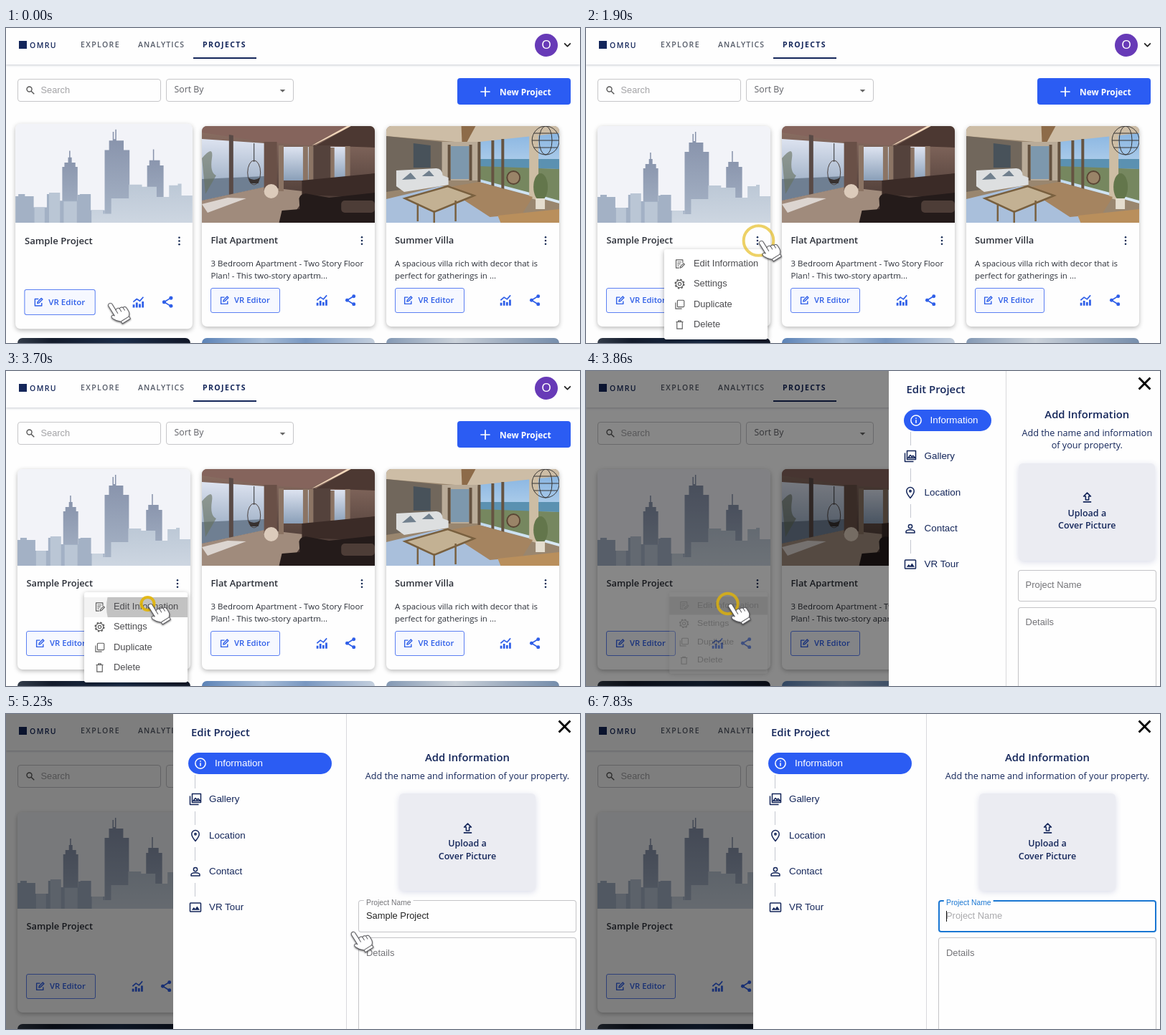
Write an HTML page that moves like this. It is 800 by 440 pixels and loops after 8000 ms.

```html
<!DOCTYPE html>
<html lang="en">
<head>
<meta charset="utf-8">
<title>Edit project information</title>
<style>
html, body { margin: 0; width: 100%; height: 100%; overflow: hidden; background: #fefefe; }
#stage { position: absolute; left: 0; top: 0; width: 800px; height: 440px; overflow: hidden; background: #fefefe;
  font-family: "Open Sans", "Noto Sans", sans-serif; color: #2b2f38; }
#stage div, #stage svg { position: absolute; box-sizing: border-box; }
.t { white-space: pre; line-height: 20px; }
.a { font-family: "Liberation Sans", Arial, sans-serif; }
.s { font-weight: 600; }
.navy { color: #14265a; }
#head { left: 0; top: 0; width: 800px; height: 51px; background: #fefefe; box-shadow: 0 1px 3px rgba(40, 50, 80, .25); }
.box { border: 1px solid #c6c6c9; border-radius: 4px; }
.card { width: 241px; height: 280px; top: 137px; border-radius: 7px; background: #fefefe;
  box-shadow: 0 2px 6px rgba(0, 0, 0, .28); }
.card > .pic { left: 0; top: 0; border-radius: 7px 7px 0 0; }
.vr { left: 12px; top: 225.5px; width: 97px; height: 35px; border: 1px solid #5c80f2; border-radius: 3px; background: #f6f8ff; }
.next { top: 433px; width: 241px; height: 20px; border-radius: 7px 7px 0 0; }
#menu { left: 109px; top: 309px; width: 143.5px; height: 126px; background: #fff; border-radius: 3px; transform-origin: 100% 0;
  box-shadow: 0 2px 7px rgba(0, 0, 0, .32); }
#row { left: 0; top: 6.5px; width: 143.5px; height: 28px; overflow: hidden; background: #f3f3f3; }
#ripple { border-radius: 50%; background: rgba(40, 40, 40, .24); }
#shade { left: 0; top: 0; width: 800px; height: 440px; background: #000; }
#panel { right: 0; top: 0; height: 440px; background: #fefefe; overflow: hidden; }
#side { left: 0; top: 0; width: calc(41.36% + 7.5px); height: 440px; border-right: 1px solid #d9d9dc; overflow: hidden; }
#pill { left: 21px; right: 20px; top: 54px; height: 30px; border-radius: 15px; background: #2b5cf3; }
#main { left: calc(41.36% + 7.5px); right: 0; top: 50px; padding: 0 5px 0 16px; height: 390px; text-align: center; }
#main h2 { margin: 0; font-size: 14.8px; font-weight: 600; line-height: 20px; }
#main p { margin: 7.5px -20px 16px; padding: 0 20px; font-size: 12.63px; line-height: 17.5px; }
#stage #main > div { position: relative; }
#upload { width: 190px; height: 136px; margin: 0 auto 13px; border-radius: 6px; background: #ebecf2; left: 0;
  box-shadow: 0 2px 8px rgba(70, 80, 150, .2); }
#upload span { position: absolute; left: 0; right: 0; top: 61px; font-size: 12.5px; line-height: 17.5px; font-weight: 600; }
#name { height: 44.5px; margin-bottom: 7.5px; border-radius: 4px; }
#details { height: 150px; border-radius: 4px; }
#name > div, #details > div { text-align: left; }
#label { left: 7px; top: 11px; padding: 0 4px; background: #fefefe; transform-origin: 4px 50%; }
#caret { width: 1px; height: 15px; top: 14.5px; background: #111; }
</style>
</head>
<body>
<div id="stage"></div>
<script>
const BLUE = '#2f5fe8', NAVY = '#14265a', LOOP = 8000;

// Text placed by its left edge and its vertical middle.
const txt = (x, cy, str, size, cls = '', css = '', id = '') =>
  `<div class="t ${cls}" id="${id}" style="left:${x}px;top:${cy - 10}px;font-size:${size}px;${css}">${str}</div>`;

const ICONS = {
  search: '<circle cx="9.5" cy="9.5" r="6"/><path d="M14 14l7 7"/>',
  plus: '<path d="M12 2v20M2 12h20"/>',
  chevron: '<path d="M4 8l8 8 8-8"/>',
  arrow: '<path d="M5 9h14l-7 7z" fill="currentColor" stroke="none"/>',
  edit: '<path d="M20 14v7H3V4h9M9 15l1-4 9-9 3 3-9 9z"/>',
  chart: '<path stroke-width="4" d="M3 23v-6M9 23v-10M15 23v-7M21 23V11"/><path d="M2 12l7-6 6 4 7-8"/>',
  share: '<path d="M18 4L5 12l13 8"/><g fill="currentColor" stroke="none"><circle cx="18.5" cy="4" r="3.6"/><circle cx="5" cy="12" r="3.6"/><circle cx="18.5" cy="20" r="3.6"/></g>',
  dots: '<g fill="currentColor" stroke="none"><circle cx="12" cy="4" r="2.2"/><circle cx="12" cy="12" r="2.2"/><circle cx="12" cy="20" r="2.2"/></g>',
  note: '<path d="M19 10V3H4v18h7M7 8h9M7 12h7M7 16h4M13 21l1-4 7-6 2 2-7 7z"/>',
  gear: '<circle cx="12" cy="12" r="3.5"/><circle cx="12" cy="12" r="8.3"/><circle cx="12" cy="12" r="10" stroke-width="2.6" stroke-dasharray="3.93 3.93"/>',
  copy: '<rect x="7" y="2" width="15" height="15" rx="2"/><path d="M17 21H3V7"/>',
  trash: '<path d="M4 5.5h16M9 5V3h6v2M6 6v15h12V6"/>',
  info: '<circle cx="12" cy="12" r="9.5"/><path d="M12 11v6M12 7v2"/>',
  gallery: '<path d="M2 6v16h16M6 2h16v16H6zM8 15l4-5 3 3 2-2 4 4z"/>',
  pin: '<path d="M12 22c-5-6-7-9-7-13a7 7 0 0 1 14 0c0 4-2 7-7 13z"/><circle cx="12" cy="9" r="1.6"/>',
  person: '<circle cx="12" cy="8" r="3.5"/><path d="M4 20v-2c0-5 16-5 16 0v2z"/>',
  image: '<rect x="2" y="4" width="20" height="16" rx="1"/><path d="M5 17l4-5 3 3 3-5 5 7z" fill="currentColor" stroke="none"/>',
  upload: '<path d="M4 21h16M9 17v-7H5l7-7 7 7h-4v7z"/>',
  close: '<path d="M2 2l20 20M22 2L2 22"/>'
};
const ico = (name, cx, cy, size, color, w = 2, css = '') =>
  `<svg viewBox="0 0 24 24" width="${size}" height="${size}" style="left:${cx - size / 2}px;top:${cy - size / 2}px;color:${color};${css}"
    fill="none" stroke="currentColor" stroke-width="${w}" stroke-linejoin="round">${ICONS[name]}</svg>`;

const poly = (fill, pts) => `<polygon fill="${fill}" points="${pts}"/>`;
const rect = (fill, x, y, w, h, more = '') => `<rect fill="${fill}" x="${x}" y="${y}" width="${w}" height="${h}" ${more}/>`;
const grad = (id, a, b) => `<linearGradient id="${id}" x2="0" y2="1"><stop stop-color="${a}"/><stop offset="1" stop-color="${b}"/></linearGradient>`;

const skyline = grad('far', '#8590a9', '#a9b6c8') + grad('near', '#bcc8d6', '#cdd6e1') + rect('#f2f3f8', 0, 0, 242, 135) +
  `<g fill="url(#far)"><path d="M64 135V59h3v-6h5v-7h1.5v-9h1.500v9h2v7h5v6h3v76z"/>
  <path d="M122 135V36h6V23h5V11h1.500v10h2V8h1.500v15h10v13h8v99z"/>
  <path d="M180 135V57h3v-7h5V35h1.500v15h8v7h5v78z"/></g>
  <path fill="#a3b1c5" d="M0 135v-36h4v-3h9v3h12v15h18v-18h16v9h26v-8h3v-1h15v22h19v17z"/>
  <path fill="url(#near)" d="M104 135v-17h16v5h11v-21h24V83h18v3h20v14h17V84h12v-2h5v16h15v37z"/>
  <path fill="#bac6d5" d="M26 135v-21h14v21zM46 135V94h15v41zM66 135v-29h18v29z"/>`;

const lounge = grad('wall', '#8e7165', '#3a2c29') + grad('view', '#dde3f0', '#8a9fb8') + rect('url(#wall)', 0, 0, 242, 135) +
  poly('#85645c', '0,0 207,0 150,27 88,22 0,9') + poly('#f3d9bc', '203,0 209,0 160,25 154,27') +
  poly('#4c3832', '209,0 242,0 242,30 160,27') + poly('url(#view)', '0,18 88,24 88,85 0,104') +
  poly('#6f7f92', '0,74 88,70 88,85 0,104') + poly('#594a46', '38,12 44,13 44,96 38,98') +
  poly('#a08b7c', '0,104 88,85 150,92 120,135 0,135') + poly('#dcd5d0', '0,109 36,100 62,101 8,121') +
  rect('#695047', 87, 22, 18, 68) + rect('url(#view)', 108, 29, 94, 47) +
  '<path d="M111 27v64M145 28v54M153 28v54M182 30v46M204 28v55" stroke="#8b7464" stroke-width="7"/>' +
  rect('#54423c', 156, 27, 24, 50) + poly('#3b2b27', '140,76 242,66 242,100 140,96') +
  '<path d="M73 24v26" stroke="#333"/><ellipse cx="73" cy="65" rx="9" ry="17" fill="none" stroke="#4b413e"/><path d="M65 72q8 6 16 0l-2 8h-11z" fill="#373130"/>' +
  '<circle cx="97" cy="91" r="10" fill="#dccbbb"/><path d="M136 101q3-9 14-6l28 5 64-7v42H108l4-17 25-2z" fill="#241b1a"/>' +
  rect('#4d3d37', 195, 104, 47, 17, 'rx="5"') + '<path d="M0 45q17-20 14 0t6 24L5 95z" fill="#67715d" opacity=".6"/>';

const villa = grad('sky', '#8ab6e2', '#dcebf5') + rect('#99866f', 0, 0, 242, 135) + poly('#cdbda6', '0,0 242,0 242,18 120,24 0,14') +
  poly('#8d6b49', '105,0 125,0 112,24 106,24') + poly('#71675c', '0,14 78,22 78,80 0,92') + poly('#48525a', '38,24 62,27 62,58 38,58') +
  rect('#b9ab98', 78, 22, 50, 54) + rect('#7d98ad', 90, 28, 26, 46) +
  poly('url(#sky)', '130,22 242,10 242,108 130,78') + poly('#5b91b1', '130,46 242,46 242,60 130,58') +
  poly('#76875f', '130,56 242,60 242,104 130,74') +
  '<path d="M88 26v50M118 26v50M130 22v56M149 20v64M163 18v72" stroke="#655341" stroke-width="4"/>' +
  poly('#cdbda4', '200,14 213,12 213,104 200,100') + poly('#a9bfdb', '0,102 75,84 150,86 170,135 0,135') +
  poly('#a58460', '82,86 130,78 205,99 190,123 145,127') +
  '<path d="M14 62l56-3q8 0 9 10l8 3v10l-62 10-11-8z" fill="#dddfe0"/><path d="M22 75l12-10 8 9M50 70l10-8 7 8" fill="#71808e"/>' +
  '<path d="M26 101l60-17 37 13-56 23zM44 108v25M97 104v29M67 118v17" fill="#c3b193" stroke="#79603f" stroke-width="2.5"/>' +
  poly('#b98f5c', '156,125 242,116 242,135 160,135') +
  '<g fill="none" stroke="#373534"><ellipse cx="223" cy="20" rx="19" ry="20"/><ellipse cx="223" cy="20" rx="9" ry="20"/><path d="M204 20h38M207 10h32M207 30h32"/></g>' +
  '<ellipse cx="216" cy="85" rx="10" ry="19" fill="#63764b"/>' + rect('#e4ddcf', 209, 101, 13, 15) +
  '<circle cx="178" cy="72" r="9" fill="#9a8468" stroke="#5b4635" stroke-width="2"/>';

const pic = body => `<svg class="pic" width="241" height="135" viewBox="0 0 242 135" preserveAspectRatio="none">${body}</svg>`;
const card = (x, art, title, lines, id = '') => `<div class="card" id="${id}" style="left:${x}px">${pic(art)}` +
  txt(12.5, 159, title, 12.85, 's') + ico('dots', 222.5, 159.5, 14, '#172b55') +
  lines.map((s, i) => txt(12.5, 191.5 + 17.5 * i, s, 11.47)).join('') +
  `<div class="vr">${ico('edit', 18, 16.5, 13, BLUE, 2.6)}${txt(32, 16, 'VR Editor', 11.3, 's', 'color:' + BLUE)}</div>` +
  ico('chart', 167, 243.5, 16.5, BLUE, 2.4) + ico('share', 207.5, 243, 16.5, BLUE, 2.4) + '</div>';
const next = (x, bg) => `<div class="next" style="left:${x}px;background:${bg}"></div>`;

const menuItems = [['note', 'Edit Information'], ['gear', 'Settings'], ['copy', 'Duplicate'], ['trash', 'Delete']];
const steps = [['info', 'Information'], ['gallery', 'Gallery'], ['pin', 'Location'], ['person', 'Contact'], ['image', 'VR Tour']];

const page = `<div id="head">
  <div style="left:18px;top:18px;width:11px;height:11px;background:${NAVY}"></div>
  ${txt(33, 23.5, 'OMRU', 10.5, 's navy', 'letter-spacing:1.4px')}
  ${txt(104, 23, 'EXPLORE', 10.5, 's', 'letter-spacing:1.4px;color:#555b68')}
  ${txt(184, 23, 'ANALYTICS', 10.5, 's', 'letter-spacing:1.1px;color:#555b68')}
  ${txt(274, 23, 'PROJECTS', 10.5, 'navy', 'letter-spacing:1.4px;font-weight:700')}
  <div style="left:261px;top:41px;width:88px;height:2px;background:${NAVY}"></div>
  <div class="a" style="left:737px;top:7.5px;width:32px;height:32px;border-radius:50%;background:#673ab7;color:#fff;font-size:17px;line-height:32px;text-align:center">O</div>
  ${ico('chevron', 782, 23.5, 13, '#222', 3.2)}</div>
  <div class="box" style="left:15.5px;top:70.5px;width:200px;height:32px"></div>
  ${ico('search', 34, 86.5, 14, '#555', 2.4)}${txt(48.5, 86.5, 'Search', 12.8, 'a', 'color:#a3a3a6')}
  <div class="box" style="left:223px;top:70.5px;width:177.5px;height:32px"></div>
  ${txt(234.5, 85.5, 'Sort By', 12.3, '', 'color:#5f6066')}${ico('arrow', 385, 87.5, 13, '#666')}
  <div style="left:629px;top:70px;width:158px;height:37px;border-radius:4px;background:#2b5cf3"></div>
  ${ico('plus', 668, 89, 16, '#fff', 2.6)}${txt(688, 89, 'New Project', 11.9, '', 'font-weight:700;color:#fff')}` +
  card(15.5, skyline, 'Sample Project', [], 'first') +
  card(273, lounge, 'Flat Apartment', ['3 Bedroom Apartment - Two Story Floor', 'Plan! - This two-story apartm...']) +
  card(529.5, villa, 'Summer Villa', ['A spacious villa rich with decor that is', 'perfect for gatherings in ...']) +
  next(15.5, 'linear-gradient(90deg,#333c49,#131b2b 20%,#1a2c48 60%,#121828)') +
  next(273, 'linear-gradient(90deg,#5c83b7,#a9bed8 35%,#7897c1 60%,#c4cfdd)') +
  next(529.5, 'linear-gradient(90deg,#8499b4,#cbd2da 40%,#9dacbf 70%,#768eac)');

const menu = '<div id="menu"><div id="row"><div id="ripple"></div></div>' +
  menuItems.map(([icon, s], i) => ico(icon, 21, 20.5 + 28.3 * i, 15, '#5c5c5c', 1.8) +
    txt(41, 20 + 28.3 * i, s, 12.9, 'a', 'color:#4b4b4e')).join('') + '</div>';

const side = txt(25, 25, 'Edit Project', 14.9, 's navy') + '<div id="pill"></div>' +
  steps.map(([icon, s], i) => {
    const y = 69 + 50.3 * i, on = i === 0;
    const line = on ? '' : `<div style="left:30px;top:${y - 34}px;width:1px;height:19px;background:#c5c8d0"></div>`;
    return line + ico(icon, on ? 38 : 30.5, y, 18, on ? '#fff' : NAVY, 2) +
      txt(on ? 58 : 50, y, s, 13.4, 'a', 'color:' + (on ? '#fff' : NAVY));
  }).join('');

const panel = `<div id="panel"><div id="side">${side}</div><div id="main" class="navy">
  <h2>Add Information</h2><p>Add the name and information of your property.</p>
  <div id="upload">${ico('upload', 95, 48, 17, NAVY, 2.2)}<span>Upload a<br>Cover Picture</span></div>
  <div id="name">${txt(11, 22, '', 12.9, 'a', 'color:#222', 'value')}${txt(11, 22, 'Project Name', 12.9, 'a', 'color:#a9a9ac', 'hint')}
    <div id="label" class="t a" style="font-size:12.9px">Project Name</div><div id="caret"></div></div>
  <div id="details">${txt(11, 21.5, 'Details', 12.9, 'a', 'color:#747478')}</div></div>
  ${ico('close', 0, 17.5, 19, '#000', 3.6, 'left:auto;right:12px')}</div>`;

const cursor = `<svg width="800" height="440" style="left:0;top:0">
  <circle id="ring" fill="none" stroke="#e3b505" stroke-width="4"/>
  <g id="hand" style="filter:drop-shadow(.5px 1px 1px rgba(0,0,0,.55))">
  <g transform="translate(3 2) rotate(-32) scale(1.1)" stroke="#5c5c60" stroke-width=".9" stroke-linejoin="round" stroke-linecap="round">
    <path fill="#fff" d="M-2.600 2.500a2.600 2.600 0 0 1 5.200 0V11q4-1.500 5 1 3.500-1 4.300 1.400 3.500-.4 3.700 3v4q0 4-3 6v4h-12v-3q-5-4-7-9-1-3.500 1.500-3.700 1.700 0 2.300 2z"/>
    <path fill="none" d="M2.600 11v5M7.600 12.500v4M12 14v3.500M1.200 27h11"/></g></g></svg>`;

const stage = document.getElementById('stage');
stage.innerHTML = page + menu + '<div id="shade"></div>' + panel + cursor;
const el = id => document.getElementById(id);
const show = (node, on) => { node.style.visibility = on ? 'visible' : 'hidden'; };

const part = (t, from, ms) => Math.max(0, Math.min(1, (t - from) / ms));
const smooth = p => p * p * (3 - 2 * p);
const easeOut = p => 1 - (1 - p) ** 2;

const spots = [[141, 383], [240, 296], [197, 324], [678, 288]];
const moves = [[260, 1110], [2130, 2740], [4650, 5690]];
const clicks = [1260, 3425, 5720];
const OPEN_MENU = 1360, OPEN_PANEL = 3734, FILL = 3950, FOCUS = 5720, ERASE = 6375, KEY = 33;
const WORD = 'Sample Project';

function handAt(t) {
  let [x, y] = spots[0];
  moves.forEach(([a, b], i) => {
    const k = smooth(part(t, a, b - a));
    x += (spots[i + 1][0] - spots[i][0]) * k;
    y += (spots[i + 1][1] - spots[i][1]) * k;
  });
  return [x, y];
}

function drawMenu(t) {
  const grow = easeOut(part(t, OPEN_MENU, 230)), leave = part(t, OPEN_PANEL, 190);
  const v = (.75 + .25 * grow) * (1 - .25 * leave ** 4);
  const node = el('menu');
  node.style.opacity = grow * (1 - leave);
  node.style.transform = `scale(${v},${v * v})`;
  show(node, t >= OPEN_MENU && leave < 1);
  el('row').style.background = t > 2480 ? '#f3f3f3' : 'transparent';
  const r = 96 * smooth(part(t, 3450, 430));
  el('ripple').style.cssText = `left:${91 - r}px;top:${14 - r}px;width:${2 * r}px;height:${2 * r}px`;
}

function drawField(t) {
  const focus = t >= FOCUS, filled = t >= FILL;
  const erased = t < ERASE ? 0 : Math.min(WORD.length, 1 + Math.floor((t - ERASE) / KEY));
  const word = filled ? WORD.slice(0, WORD.length - erased) : '';
  const value = el('value'), label = el('label');
  value.textContent = word;
  el('hint').style.opacity = part(t, ERASE + KEY * 13, 150);
  const edge = (on, hover) => on ? 'inset 0 0 0 2px #1976d2' : 'inset 0 0 0 1px ' + (hover ? '#222' : '#c4c4c7');
  el('name').style.boxShadow = edge(focus, t > 5400);
  el('details').style.boxShadow = edge(false, t > 5290 && t < 5400);
  const k = easeOut(part(t, FILL, 180));
  label.style.transform = `translateY(${-16.7 * k}px) scale(${1 - .2 * k})`;
  label.style.color = focus ? '#1976d2' : '#747478';
  const lit = focus && (t < 6250 || (t >= ERASE && t < 7300) || t >= 7830);
  show(el('caret'), lit);
  el('caret').style.left = 11 + (word ? value.offsetWidth : 0) + 'px';
}

function draw(t) {
  el('first').style.transform = `scale(${1 + .024 * (1 - smooth(part(t, 1380, 250)))})`;
  drawMenu(t);
  el('shade').style.opacity = .5 * part(t, 3720, 150);
  const open = easeOut(part(t, OPEN_PANEL, 300));
  el('panel').style.width = 567 * open + 'px';
  show(el('panel'), open > 0);
  drawField(t);

  const [x, y] = handAt(t);
  el('hand').setAttribute('transform', `translate(${x} ${y})`);
  show(el('hand'), t < ERASE);
  const hit = clicks.findIndex(c => t >= c && t < c + 1200);
  show(el('ring'), hit >= 0);
  if (hit >= 0) {
    const p = (t - clicks[hit]) / 1200, [cx, cy] = spots[hit + 1], ring = el('ring');
    ring.setAttribute('cx', cx + .5);
    ring.setAttribute('cy', cy + 1);
    ring.setAttribute('r', 39 * p);
    ring.setAttribute('opacity', 1 - p ** 1.5);
  }
}

const start = performance.now();
function tick() {
  draw((performance.now() - start) % LOOP);
  requestAnimationFrame(tick);
}
tick();
</script>
</body>
</html>
```
